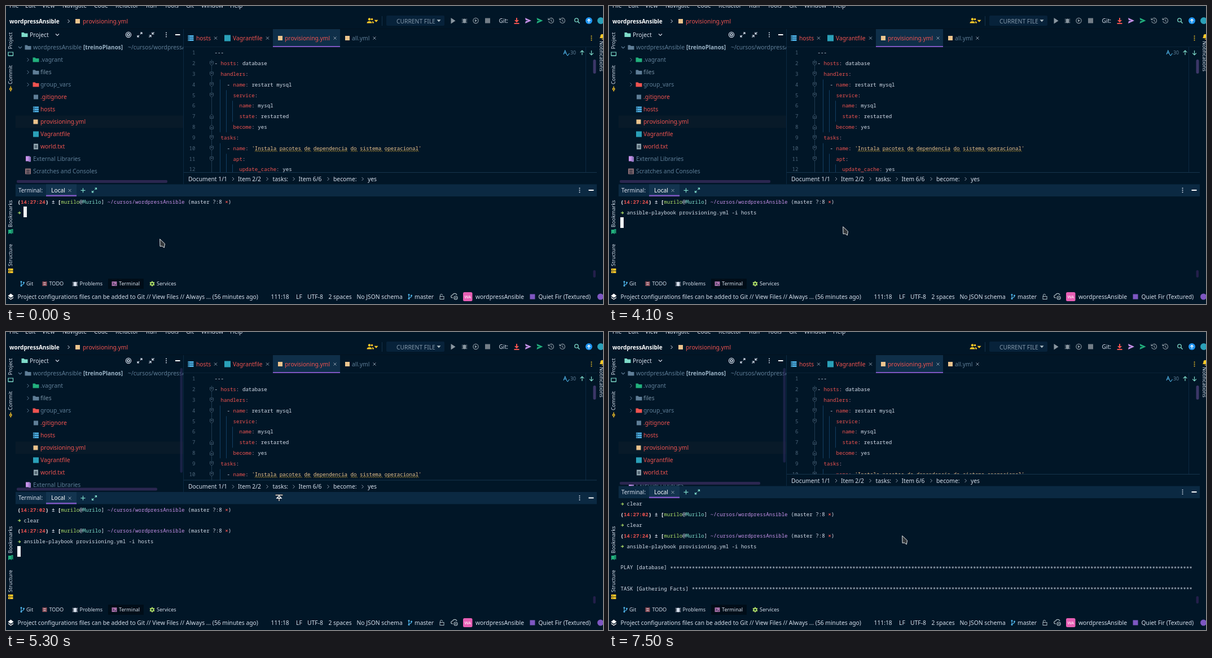
These frames come from a looping animation (1058 by 529 pixels, 8000 ms). An HTML page:

```html
<!DOCTYPE html>
<html lang="en">
<head>
<meta charset="utf-8">
<title>IDE terminal run</title>
<style>
html, body { margin: 0; width: 100%; height: 100%; overflow: hidden; background: #011627; }
svg { display: block; width: 1058px; height: 529px; }
text { white-space: pre; font-family: "Noto Sans", "Open Sans", sans-serif; }
text.mono { font-family: "Noto Sans Mono", "DejaVu Sans Mono", monospace; font-size: 9.15px; }
</style>
</head>
<body>
<svg id="stage" viewBox="0 0 1058 529"></svg>
<script>
const BG = '#011627', LIGHT = '#d6deeb', WHITE = '#ffffff', RED = '#ef5350', DIM = '#5f7e97',
  PURPLE = '#7e57c2', TEAL = '#2aa0b8', GREEN = '#22b07d', YELLOW = '#ffca28', BAR = '#0b2942',
  LILAC = '#c792ea', CYAN = '#7fdbca', LIME = '#addb67', SAND = '#ecc48d', BLUE = '#4fb3e8', GRAY = '#8a96a0';
const CH = 5.49, ROW = 18.83;

// Drawing helpers
const text = (x, y, s, fill = LIGHT, size = 10.3, extra = '') =>
  `<text x="${x}" y="${y}" fill="${fill}" font-size="${size}" ${extra}>${s}</text>`;
const mono = (x, y, s, fill = LIGHT, extra = '') =>
  `<text class="mono" x="${x}" y="${y}" fill="${fill}" ${extra}>${s}</text>`;
const rect = (x, y, w, h, fill, extra = '') =>
  `<rect x="${x}" y="${y}" width="${w}" height="${h}" fill="${fill}" ${extra}/>`;
const line = (d, color, w = 1) =>
  `<path d="${d}" fill="none" stroke="${color}" stroke-width="${w}"/>`;
const fill = (d, color) => `<path d="${d}" fill="${color}"/>`;
const dot = (x, y, r, color) => `<circle cx="${x}" cy="${y}" r="${r}" fill="${color}"/>`;
const ring = (x, y, r, color, w = 1) =>
  `<circle cx="${x}" cy="${y}" r="${r}" fill="none" stroke="${color}" stroke-width="${w}"/>`;
const square = (x, y, s, color) => rect(x - s / 2, y - s / 2, s, s, color);
const bold = 'font-weight="700"';

// Icons, placed by their centre
const right = (x, y, c = DIM) => line(`M${x - 1.5} ${y - 3}l3 3l-3 3`, c);
const down = (x, y, c = DIM) => line(`M${x - 3} ${y - 1.5}l3 3l3 -3`, c, 1.1);
const caret = (x, y, c) => fill(`M${x - 3.5} ${y - 1.8}h7l-3.5 4z`, c);
const cross = (x, y, c = '#8a9bab') => line(`M${x - 2.5} ${y - 2.5}l5 5m0 -5l-5 5`, c);
const dots = (x, y, c) => [-3.5, 0, 3.5].map(d => dot(x, y + d, 1, c)).join('');
const folder = (x, y, c) => fill(`M${x - 5.5} ${y - 4}h4l1.5 1.5h5.5v6.5h-11z`, c);
const server = (x, y, c = BLUE) => [-5, -1.4, 2.2].map(d =>
  rect(x - 5, y + d, 10, 2.8, c) + rect(x - 4, y + d + 1, 1.3, 1, BG)).join('');
const yaml = (x, y) => square(x, y, 8, SAND);
const doc = (x, y, c) => rect(x - 4, y - 5, 8, 10, c) + line(`M${x - 2.3} ${y - 1}h4.6m-4.6 2.5h4.6`, BG);
const branch = (x, y, c) => line(`M${x - 2} ${y - 3}v6.5m0 -1.5q4.5 0 4.5 -3.5`, c, 1.2) +
  dot(x - 2, y - 3.5, 1.5, c) + dot(x - 2, y + 3.5, 1.5, c) + dot(x + 2.5, y - 2, 1.5, c);
const resizeArrows = (x, y, c) => line(`M${x + 1} ${y - 1}l3 -3m-3 0h3v3M${x - 1} ${y + 1}l-3 3m3 0h-3v-3`, c, 1.2);
const plane = (x, y, c) => fill(`M${x - 5} ${y - 5}l11 5l-11 5l1 -4l5 -1l-5 -1z`, c);
const gear = (x, y, c) => ring(x, y, 2.6, c, 2) +
  [0, 60, 120].map(a => `<path d="M${x} ${y - 4.6}v1.6m0 6v1.6" stroke="${c}" stroke-width="2" transform="rotate(${a} ${x} ${y})"/>`).join('');
const bug = (x, y, c) => `<ellipse cx="${x}" cy="${y + .5}" rx="2.8" ry="4" fill="${c}"/>` +
  line(`M${x - 4.8} ${y - 2.5}h9.6m-9.6 3h9.6m-9.6 3h9.6`, c);
const clock = (x, y, c) => line(`M${x - 4} ${y - 2}a4.5 4.5 0 1 1 -.3 3M${x - 5} ${y - 4.5}v3h3M${x} ${y - 2.5}v3l2 1`, c, 1.1);
const vertical = (bottom, s) =>
  text(0, 0, s, LIGHT, 9.1, `transform="translate(11.3 ${bottom}) rotate(-90)"`);

function topBar() {
  const menu = { File: 6, Edit: 34, View: 64, Navigate: 100, Code: 156, Refactor: 194, Run: 248, Tools: 281, Git: 319, Window: 346, Help: 397 };
  return Object.entries(menu).map(([s, x]) => text(x, 3.2, s)).join('') +
    text(6, 30.5, 'wordpressAnsible', WHITE, 10, bold) + right(111, 27, LIGHT) + yaml(127, 27) +
    text(136, 30.5, 'provisioning.yml', RED) +
    dot(644, 23.5, 2.2, YELLOW) + dot(648.5, 23.5, 1.8, YELLOW) +
    fill('M639.5 30.5q0 -3.6 4.5 -3.6t4.5 3.6zM649.5 30.5q0 -2.5 -1 -3.5q3.5 0 3.5 3.5z', YELLOW) +
    caret(656, 26.5, YELLOW) + line('M666.5 18v17', '#14324a') +
    rect(674, 17, 103, 18, '#07223a', 'rx="2"') + text(692, 30.5, 'CURRENT FILE', '#8296a8') + caret(767, 26, '#b0bec5') +
    fill('M788.5 21l8 5.2l-8 5.2z', GRAY) + bug(812.5, 26, GRAY) +
    ring(832.5, 26, 4.6, GRAY, 1.2) + fill('M831 23.5l4 2.5l-4 2.5z', GRAY) + square(853.5, 26, 9, '#737d87') +
    text(873.5, 30, 'Git:') + line('M905 21v6M900.5 31h9', RED, 2) + fill('M901 25h8l-4 4.4z', RED) +
    plane(925, 26, LILAC) + plane(945.5, 26, GREEN) + clock(966, 26, GRAY) + clock(986, 26, GRAY) +
    ring(1011, 25, 3.2, CYAN, 1.3) + line('M1013.5 27.5l3 3.2', CYAN, 1.4) +
    dot(1033, 26, 6, '#2196f3') + line('M1033 29.5v-6m-2.6 2.6l2.6 -2.6l2.6 2.6', WHITE, 1.3) + dot(1054, 26, 6, TEAL);
}

function tree() {
  const y = i => 73.5 + i * 22;
  const label = (i, x, s, c) => text(x, y(i) + 3.9, s, c);
  return rect(17, 194.5, 297, 22, '#081a29') +
    line('M17 40.5H1047', '#04121e') +
    folder(33, 51, CYAN) + text(42, 55, 'Project') + down(91, 51, LIGHT) +
    ring(217, 51, 4.6, LIGHT, 1.2) + ring(217, 51, 2, LIGHT, 1.5) + resizeArrows(237, 51, LIGHT) +
    line('M259 50l3.5 -3.5m-3.5 0v3.5h3.5M257 52l-3.5 3.5m3.5 0v-3.5h-3.5', LIGHT, 1.2) +
    dots(284, 51, LIGHT) + rect(300, 50, 8.5, 2, WHITE) +
    down(25, y(0)) + folder(39, y(0), DIM) + label(0, 48, 'wordpressAnsible', DIM) +
    text(137, y(0) + 3.9, '[treinoPlanos]', '#9bb3c6', 10, bold) + label(0, 216, '~/cursos/wordpressAnsible', DIM) +
    [1, 2, 3].map(i => right(39, y(i)) + folder(53, y(i), [GREEN, DIM, RED][i - 1])).join('') +
    label(1, 61, '.vagrant', DIM) + label(2, 61, 'files', '#7892a6') + label(3, 61, 'group_vars', DIM) +
    square(53, y(4), 8, DIM) + label(4, 61, '.gitignore', RED) +
    server(53, y(5)) + label(5, 61, 'hosts', RED) + yaml(52.5, y(6)) + label(6, 61, 'provisioning.yml', RED) +
    square(53, y(7), 10, TEAL) + label(7, 61, 'Vagrantfile', RED) + doc(53, y(8), '#90a4ae') + label(8, 61, 'world.txt', RED) +
    rect(35, y(9) - 5, 7, 9, LILAC) + rect(40, y(9) - 4, 4, 9, '#9a7ac8') + label(9, 48, 'External Libraries', DIM) +
    rect(34, y(10) - 5, 10, 10, '#8d6e75') + line(`M36 ${y(10) - 2}h6m-6 2.5h6m-6 2.5h6`, BG) + label(10, 48, 'Scratches and Consoles', DIM);
}

function editor() {
  const code = [[0, '---'], [0, '- ', 'hosts', 'database'], [2, '', 'handlers'], [4, '- ', 'name', 'restart mysql'],
    [6, '', 'service'], [8, '', 'name', 'mysql'], [8, '', 'state', 'restarted'], [6, '', 'become', 'yes'], [2, '', 'tasks'],
    [4, '- ', 'name', "'Instala pacotes de dependencia do sistema operacional'"], [6, '', 'apt'], [8, '', 'update_cache', 'yes']];
  const mid = i => 83 + ROW * i;
  let out = rect(314, 41, 733, 276, BG) + line('M314.5 41V317', '#0b2942') + line('M315 72.5H1047', '#0a2236') +
    line('M1027.5 73V300', '#0b2942') + line('M364.5 95V300', '#1f3a50');
  const guides = [[2, 3, 8], [4, 4, 8], [6, 5, 7], [2, 9, 12], [4, 10, 12], [6, 11, 12]];
  for (const [col, a, b] of guides)
    out += line(`M${Math.round(369.5 + col * CH) - .5} ${mid(a) - 9}V${mid(b) - 9.4}`, '#123f63');
  code.forEach(([col, dash, key, value], i) => {
    const x = 369.5 + col * CH, y = mid(i) + 3.2;
    out += mono(335.5, y, i + 1, '#4b6479', 'text-anchor="end"') + mono(x, y, dash);
    if (!key) return;
    const kx = x + dash.length * CH;
    out += mono(kx, y, key + '<tspan fill="#c9a0b8">:</tspan>', RED);
    if (value) out += mono(kx + (key.length + 2) * CH, y, value, value[0] === "'" ? SAND : LIGHT);
  });
  let col = 13;
  for (const word of 'Instala pacotes de dependencia do sistema operacional'.split(' ')) {
    let d = `M${369.5 + col * CH} 258.5`;
    for (let k = 0; k < word.length * CH / 4 - .5; k++) d += 'l2 -1.8l2 1.8';
    out += line(d, '#a8862f', .9);
    col += word.length + 1;
  }
  for (const i of [1, 2, 3, 4, 6, 7, 8, 9, 10]) {
    const s = i === 6 || i === 7 ? -1 : 1, y = mid(i);
    out += `<path d="M361.5 ${y - 3.5 * s}h6v${4.5 * s}l-3 ${2.5 * s}l-3 ${-2.5 * s}z" fill="${BG}" stroke="#3d566a"/>` +
      line(`M363 ${y - s}h3`, '#56708a');
  }
  const tab = (x, s, c, close) => text(x, 61, s, c) + cross(close, 57);
  return out + rect(473, 41, 119, 31, '#0f2f49') + rect(473, 71, 119, 2, PURPLE) +
    server(327.5, 57) + tab(337, 'hosts', RED, 371.5) + square(392.5, 57, 11, TEAL) + tab(402, 'Vagrantfile', RED, 463.5) +
    yaml(486, 57) + tab(494, 'provisioning.yml', RED, 583) + yaml(605, 57) + tab(613, 'all.yml', DIM, 653) +
    dots(1037.5, 57, YELLOW) +
    line('M988 86l2.8 -7l2.8 7m-4.6 -2.5h3.6M993.5 86l1.8 2l3.2 -4', BLUE, 1.1) + text(1000, 86.3, '30', DIM, 8.8) +
    line('M1021 87v-8m-3.4 3.4l3.4 -3.4l3.4 3.4M1037.5 79v8m-3.4 -3.4l3.4 3.4l3.4 -3.4', CYAN, 1.2) +
    rect(1040.5, 95, 5, 25, '#3c3768', 'rx="2.5"');
}

function terminalRows() {
  const arrow = [0, null];
  const prompt = time => [[0, '(', WHITE, 1], [1, time, RED, 1], [9, ')', WHITE, 1], [11, '±', LIGHT, 1], [13, '[', WHITE, 1],
    [14, 'murilo', LIME], [20, '@', LIGHT], [21, 'Murilo', CYAN], [27, ']', LIGHT], [29, '~/cursos/wordpressAnsible', LILAC],
    [55, '(master ?:8', LIGHT], [67, '×', RED, 1], [68, ')', LIGHT]];
  const banner = s => [[0, s], [s.length + 1, `<tspan dy="1.6">${'*'.repeat(184 - s.length)}</tspan>`]];
  const clear = [arrow, [2, 'clear']];
  const rows = [clear, prompt('14:27:02'), clear, prompt('14:27:24'), [arrow, [2, '<tspan id="command">ansible-playbook provisioning.yml -i hosts</tspan>']],
    [], banner('PLAY [database]'), [], banner('TASK [Gathering Facts]')];
  return rows.map((parts, i) => `<g id="row${i}">` + parts.map(([col, s, c, b]) => {
    const x = 20.5 + col * CH, y = i * ROW;
    return s ? mono(x, y + 3.2, s, c, b ? bold : '') : line(`M21 ${y + .3}h4.3m-2 -2.2l2.2 2.2l-2.2 2.2`, LIME, 1.1);
  }).join('') + '</g>').join('');
}

// Everything carried by the splitter, drawn at its starting height
function lowerPane() {
  const crumbs = [[323, 'Document 1/1'], [411, 'Item 2/2'], [472.5, 'tasks:'], [518.5, 'Item 6/6'], [580, 'become:'], [641, 'yes']];
  return rect(17, 316.5, 1030, 230, BG) + rect(315, 296, 732, 21, BG) + line('M315 295.5H1047', '#16344c') +
    crumbs.map(([x, s]) => text(x, 310.8, s)).join('') + [402.5, 463, 510, 571, 632].map(x => right(x, 307, '#8a9bab')).join('') +
    rect(17, 316.5, 1030, 21.5, BAR) + rect(71, 316.5, 54, 21.5, '#13344f') + rect(71, 335.5, 54, 2.5, PURPLE) +
    text(22, 330.8, 'Terminal:', LIGHT, 9.9) + text(80, 330.8, 'Local', WHITE) + cross(113, 327.5) +
    line('M132.5 327.3h8m-4 -4v8', CYAN, 1.2) + resizeArrows(156.5, 327, CYAN) +
    dots(1016.5, 327, LIGHT) + rect(1032.5, 326, 9, 2, WHITE);
}

function frameBars() {
  const tool = (x, s) => text(x, 496.3, s, LIGHT, 9.1), stat = (x, s) => text(x, 520, s);
  return rect(17, 484, 1030, 45, BG) +
    rect(1040.5, 469, 4.5, 13, '#231f4a', 'rx="2"') +
    vertical(76.5, 'Project') + line('M4 82h8.5v6h-8.5zM4 88.5h8.5', CYAN, 1.2) +
    vertical(139, 'Commit') + line('M8.3 142v10', YELLOW) + dot(8.3, 147.5, 2.4, YELLOW) + dot(8.3, 147.5, 1, BG) +
    vertical(393, 'Bookmarks') + fill('M4 397h6v8l-3 -2l-3 2zM8 396h4.5v8l-2 -1v-6z', GREEN) +
    vertical(462, 'Structure') + [466, 470.5].map(y => rect(4, y, 8.5, 3.6, YELLOW) + rect(6, y + 1.3, 1.2, 1.2, BG)).join('') +
    fill('M1051.5 57q2 -1 2 -4q0 -3 3 -3h3v7zM1055 58h3v2z', YELLOW) +
    text(0, 0, 'Notifications', LIGHT, 9.1, 'transform="translate(1052 62) rotate(90)"') +
    rect(181, 484, 63, 18, '#000d18') +
    branch(29, 493, BLUE) + tool(36, 'Git') + rect(64.5, 489, 8, 8, '#8d4e58') + line('M66.5 491.5h4m-4 3h4', LIGHT) + tool(76.5, 'TODO') +
    bug(122.5, 493, LIGHT) + tool(130.5, 'Problems') + rect(187.5, 489, 9, 8, '#a86fa8') + line('M189.5 491l2 2l-2 2m3 0h2.5', BG) + tool(200, 'Terminal') +
    gear(259, 493, LIME) + tool(267, 'Services') +
    fill('M3.5 514.5l5 -4l5 4l-5 3.5z', WHITE) + line('M4 517.5l4.5 3.2l4.5 -3.2', WHITE, 1.4) +
    stat(20.5, 'Project configurations files can be added to Git // View Files // Always ... (56 minutes ago)') +
    stat(469.5, '111:18') + stat(514, 'LF') + stat(534, 'UTF-8') + stat(571.5, '2 spaces') + stat(621.5, 'No JSON schema') +
    branch(716, 516, BLUE) + stat(724, 'master') +
    line('M769.5 515.5v-2a2 2 0 0 1 4 0', '#b0bec5') + rect(769, 515.5, 7, 5, 'none', 'stroke="#b0bec5"') +
    line('M792 518h-1a2.5 2.5 0 0 1 .5 -5a4 4 0 0 1 7.5 0', '#b0bec5', 1.2) + ring(797, 518, 3, '#b0bec5', 1.2) + dot(797, 518, 1.1, '#b0bec5') +
    rect(810, 508, 16.5, 16, '#e85fb5', 'rx="2.5"') + text(818.2, 519.2, 'WA', WHITE, 7.6, 'text-anchor="middle"') +
    stat(832, 'wordpressAnsible') + square(933, 516, 9, PURPLE) + stat(943.5, 'Quiet Fir (Textured)') + dot(1053.5, 516, 5.5, PURPLE);
}

document.getElementById('stage').innerHTML = rect(0, 0, 1058, 529, BG) + topBar() + tree() + editor() +
  rect(308.5, 64, 4.5, 10, '#2b2a5a', 'id="vbar" rx="2" opacity=".6"') +
  rect(19, 309, 267, 5, '#2b2750', 'id="hbar" rx="2"') +
  `<g id="lower">${lowerPane()}</g><g id="rows">${terminalRows()}</g>` +
  rect(0, 0, 6, 19, '#eef1f4', 'id="caret"') + frameBars() +
  '<path id="arrow" d="M.7 .7L9.5 9L8.3 16L4.5 13.2L1 13.6Z" fill="#34383c" stroke="#e4e8ea"/>' +
  '<g id="split"><path d="M-7 -4.5H7M0 6V-1" stroke="#000" stroke-width="3"/>' +
  '<path d="M-6.5 -4.5H6.5M0 6V0M-4 1L0 -3L4 1Z" fill="#011627" stroke="#fff" stroke-width="1.3"/></g>';

const el = id => document.getElementById(id);
const show = (id, on) => el(id).setAttribute('display', on ? 'inline' : 'none');
const move = (id, x, y) => el(id).setAttribute('transform', `translate(${x} ${y})`);
const set = (id, attrs) => { for (const k in attrs) el(id).setAttribute(k, attrs[k]); };

// [time, x, y]
const pointerPath = [[0, 272, 413], [3800, 272, 413], [4100, 414, 391], [4500, 482, 324], [4600, 482, 324],
  [4700, 484, 330], [4900, 484, 330], [5000, 484, 326], [5100, 484, 317], [5300, 484, 294], [5400, 484, 286], [6200, 484, 286],
  [6300, 495, 305], [6400, 516, 345], [6500, 513, 368], [6700, 513, 368], [6800, 514, 371], [7100, 514, 371], [7500, 519, 361], [8000, 519, 361]];
const caretOn = [[0, 700], [1000, 2300], [2800, 3300], [3900, 4400], [4800, 6000], [6500, 7500]];
// [time, height gained by the terminal]
const splitterPath = [[0, 0], [4900, 0], [5000, 3], [5100, 9.5], [5300, 32.5], [5400, 43], [8000, 43]];

function along(path, t, k) {
  const i = path.findIndex(p => p[0] > t), a = path[i - 1], b = path[i];
  return a[k] + (b[k] - a[k]) * (t - a[0]) / (b[0] - a[0]);
}

function render(ms) {
  const t = Math.floor(ms / 100) * 100;
  const lift = along(splitterPath, t, 1), revealed = Math.ceil(lift / ROW);

  move('lower', 0, -lift);
  const view = 244.5 - lift, overflow = lift > 2;
  set('hbar', { y: 309 - lift, width: overflow ? 249 : 267 });
  set('vbar', { height: view * view / 242 });
  show('vbar', overflow);

  const top = 348 - lift + (revealed - 3) * ROW;
  move('rows', 0, top);
  for (let i = 0; i < 9; i++) {
    const printed = i < 6 || t >= (i < 8 ? 6800 : 6900);
    show('row' + i, printed && i >= 3 - revealed);
  }
  set('command', { visibility: t < 1000 ? 'hidden' : 'visible' });

  const row = t < 1800 ? 4 : t < 6800 ? 5 : t < 6900 ? 7 : 9;
  const col = t < 1000 ? 2 : t < 1800 ? 44 : 0;
  set('caret', { x: Math.round(20 + col * CH), y: Math.floor(top + row * ROW - 10) });
  show('caret', caretOn.some(([a, b]) => t >= a && t < b));

  const dragging = t >= 4700 && t < 6300;
  show('arrow', !dragging);
  show('split', dragging);
  move(dragging ? 'split' : 'arrow', along(pointerPath, t, 1), along(pointerPath, t, 2));
}

const start = performance.now();
(function tick() {
  render((performance.now() - start) % 8000);
  requestAnimationFrame(tick);
})();
</script>
</body>
</html>
```
